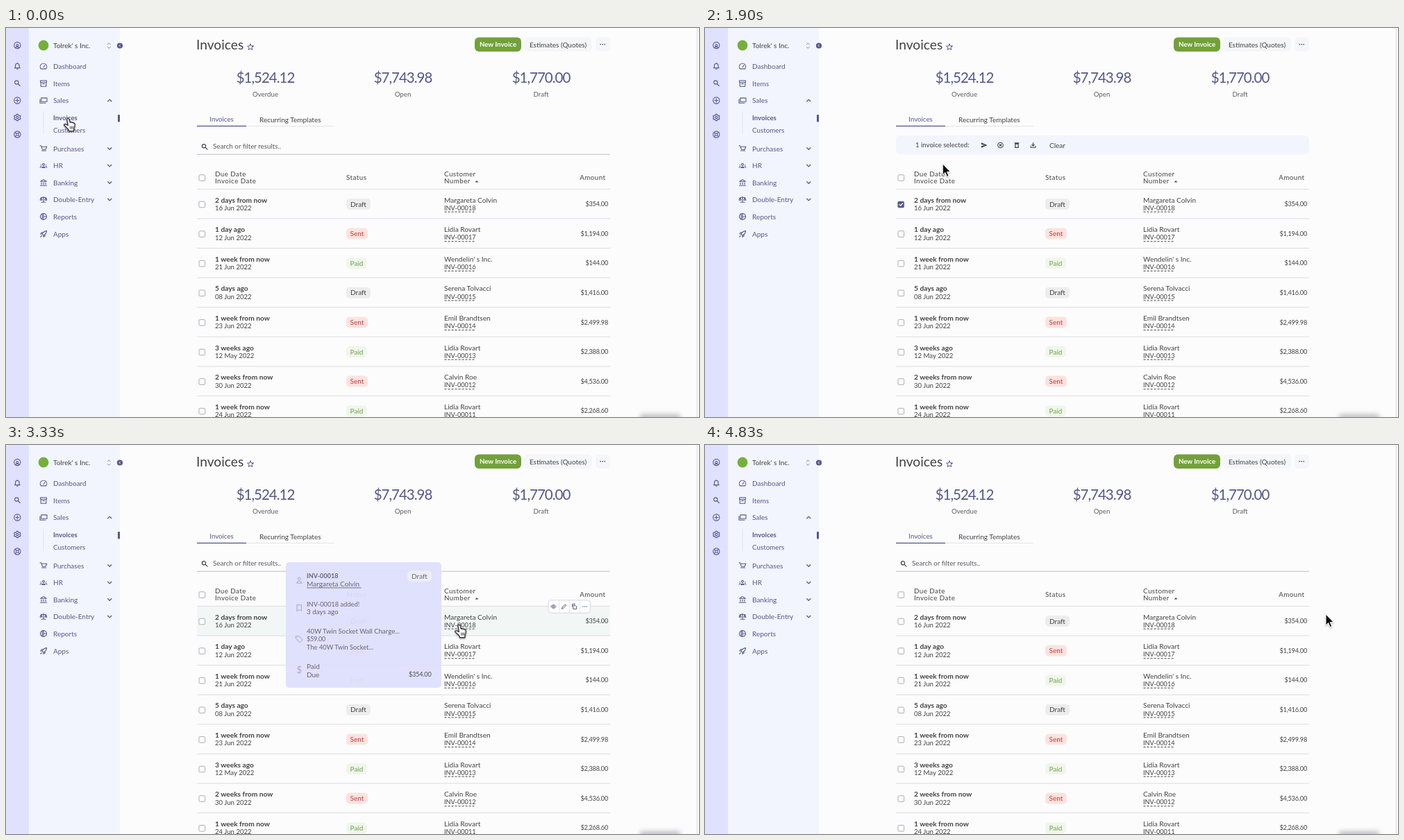
Animation, 998 px wide and 561 px high, one loop 5 s. Source, as an HTML page:

```html
<!DOCTYPE html>
<html lang="en">
<head>
<meta charset="utf-8">
<title>Invoices</title>
<style>
html, body { margin: 0; width: 100%; height: 100%; overflow: hidden; background: #fcfcfd; }
svg { display: block; width: 998px; height: 561px; font-family: Lato, sans-serif; }
</style>
</head>
<body>
<svg id="stage" viewBox="0 0 998 561" xmlns="http://www.w3.org/2000/svg"></svg>
<script>
const PURPLE = '#55588b', INK = '#424242', LOOP = 5000;
const TOP = 232.4, PITCH = 42.6;

// Markup helpers; text is placed by its vertical centre.
const text = (x, y, s, { size = 10, fill = INK, w = 400, a = 'start', ls = 0 } = {}) =>
  `<text x="${x}" y="${y + 3.5 * size / 10}" font-size="${size}" fill="${fill}" font-weight="${w}" text-anchor="${a}" letter-spacing="${ls}">${s}</text>`;
const rect = (x, y, w, h, fill, r = 0, more = '') =>
  `<rect x="${x}" y="${y}" width="${w}" height="${h}" rx="${r}" fill="${fill}" ${more}/>`;
const icon = (x, y, d, color = PURPLE, sw = 1.1) =>
  `<path transform="translate(${x} ${y})" d="${d}" fill="none" stroke="${color}" stroke-width="${sw}" stroke-linejoin="round" stroke-linecap="round"/>`;
const solid = (x, y, d, color = PURPLE) =>
  `<path transform="translate(${x} ${y})" d="${d}" fill="${color}" fill-rule="evenodd"/>`;
const ring = r => `M${-r} 0a${r} ${r} 0 1 1 ${2 * r} 0a${r} ${r} 0 1 1 ${-2 * r} 0`;
const dots = (x, y, gap, r) => [-gap, 0, gap].map(d => solid(x + d, y, ring(r))).join('');

const ICON = {
  user: ring(4.6) + ring(1.5) + 'M-3 3.4Q0 .8 3 3.4',
  bell: 'M-3.8 2.6H3.8L2.8 1.4V-1Q2.6-3.8 0-3.8Q-2.6-3.8-2.8-1V1.4ZM-.8 4.2H.8M0-4.8V-4',
  find: 'M-3.6-1a2.6 2.6 0 1 1 5.2 0a2.6 2.6 0 1 1-5.2 0M1 1L4 4',
  plus: ring(4.6) + 'M-2.4 0H2.4M0-2.4V2.4',
  gear: ring(1.6) + 'M-1-4.6H1L1.4-3.2L2.6-2.6L3.9-3L4.7-1.4L3.7-.4V.4L4.7 1.4L3.9 3L2.6 2.6L1.4 3.2L1 4.6H-1L-1.4 3.2L-2.6 2.6L-3.9 3L-4.7 1.4L-3.7 .4V-.4L-4.7-1.4L-3.9-3L-2.6-2.6L-1.4-3.2Z',
  help: ring(4.6) + ring(1.8) + 'M-3.2-3.2L-1.3-1.3M3.2-3.2L1.3-1.3M-3.2 3.2L-1.3 1.3M3.2 3.2L1.3 1.3',
  dial: 'M-3.6 3.4A4.7 4.7 0 1 1 3.6 3.4ZM0 1L2-1.6',
  box: 'M-4.4-4.2H4.4V-1.8H-4.4ZM-3.8-1.8V4.2H3.8V-1.8M-1.3 .4H1.3',
  cash: 'M-3.2-3.6H5V1.8H-3.2ZM-5-1.6V3.8H3',
  cart: 'M-5-4.2H-3.4L-1.6 1.2H3L4.8-2.8H-2.8M-2.4 3H3.6',
  team: 'M-1.4-1.8a1.4 1.4 0 1 1 2.8 0a1.4 1.4 0 1 1-2.8 0M-2.6 3Q0 .2 2.6 3ZM-4.8 2.6Q-4.4 1-3 1M4.8 2.6Q4.4 1 3 1M-3.8-1.2V-.8M3.8-1.2V-.8',
  bank: 'M-4.4-1.8L0-4.4L4.4-1.8ZM-3 0V2.6M0 0V2.6M3 0V2.6M-4.6 4.2H4.6',
  scale: 'M0-4.4V3.8M-3 3.8H3M-3.6-3H3.6M-4.8 .8L-3.4-3L-2 .8ZM2 .8L3.4-3L4.8 .8Z',
  chart: ring(4.5) + 'M0-4.4V4.4M0 0H4.4M-1.8-4V4',
  rocket: 'M-2 .2Q0-4 4.6-4.4Q4.2 0 0 2.2ZM-2 .2L-4.2 0L-2.6-2.2L-.8-2M0 2.2L0 4.4L2.2 2.8L2 1M-4.4 4.4L-2.6 2.6',
  down: 'M-2.6-1.2L0 1.4L2.6-1.2',
  up: 'M-2.6 1.2L0-1.4L2.6 1.2',
  eye: 'M-3.8 0Q0-5 3.8 0Q0 5-3.8 0' + ring(1.2),
  pen: 'M-3 3L-2.4 1L1.8-3.2L3.2-1.8L-1 2.4Z',
  copy: 'M-1.4-1.6H1.6L3 0V3.6H-1.4ZM-3-.2V-3.6H1',
  cancel: ring(3.8) + 'M-1.4-1.4L1.4 1.4M1.4-1.4L-1.4 1.4',
  bin: 'M-2.2-1.8H2.2V3.4H-2.2ZM-3-3.2H3',
  load: 'M0-3.4V1M-1.8-.6L0 1.2L1.8-.6M-3.4 1.4V3.2H3.4V1.4',
  person: 'M-1.9-2.2a1.9 1.9 0 1 1 3.8 0a1.9 1.9 0 1 1-3.8 0M-3.8 3.8Q-3 1.4 0 1.4Q3 1.4 3.8 3.8Z',
  mark: 'M-3-4.4H3V4.4L0 2.4L-3 4.4Z',
  tag: 'M-4.6-4.2H-.4L4.8 .8L.8 4.8L-4.6-.4ZM-2.8-2.4V-2.3'
};

const rows = [
  ['2 days from now', '16 Jun 2022', 'Draft', 'Margareta Colvin', '354.00'],
  ['1 day ago', '12 Jun 2022', 'Sent', 'Lidia Rovart', '1,194.00'],
  ['1 week from now', '21 Jun 2022', 'Paid', "Wendelin' s Inc.", '144.00'],
  ['5 days ago', '08 Jun 2022', 'Draft', 'Serena Tolvacci', '1,416.00'],
  ['1 week from now', '23 Jun 2022', 'Sent', 'Emil Brandtsen', '2,499.98'],
  ['3 weeks ago', '12 May 2022', 'Paid', 'Lidia Rovart', '2,388.00'],
  ['2 weeks from now', '30 Jun 2022', 'Sent', 'Calvin Roe', '4,536.00'],
  ['1 week from now', '24 Jun 2022', 'Paid', 'Lidia Rovart', '2,268.60']
];
const badges = {
  Draft: ['#ededee', INK, 35],
  Sent: ['#fce3e0', '#c5392f', 31],
  Paid: ['#f0f6ea', '#6ea152', 30]
};
const badge = (x, y, s) => {
  const [bg, fg, w] = badges[s];
  return rect(x, y - 8, w, 16, bg, 5) + text(x + w / 2, y, s, { fill: fg, a: 'middle' });
};
const checkbox = y => rect(278, y - 4.2, 8.6, 8.6, '#fff', 1.5, 'stroke="#a3a3ab" stroke-width=".9"');
const money = (x, y, s) => text(x, y, '$' + s, { size: 9.2, a: 'end', ls: -0.22 });

function sidebar() {
  const strip = [['user', 25], ['bell', 55], ['find', 79.5], ['plus', 104.5], ['gear', 129], ['help', 153.5]];
  const menu = [
    ['Dashboard', 55.5, 'dial'], ['Items', 80, 'box'], ['Sales', 104.5, 'cash', 'up'],
    ['Purchases', 174, 'cart', 'down'], ['HR', 198.5, 'team', 'down'], ['Banking', 223, 'bank', 'down'],
    ['Double-Entry', 247.5, 'scale', 'down'], ['Reports', 272, 'chart'], ['Apps', 297, 'rocket']
  ];
  return rect(0, 0, 33, 561, '#e0e1ff') + rect(33, 0, 131, 561, '#f2f5fe') +
    strip.map(([n, y]) => icon(16.3, y, ICON[n])).join('') +
    '<circle cx="54" cy="25" r="7.4" fill="#75b03a"/>' +
    text(68, 25.5, "Tolrek' s Inc.") +
    icon(148.3, 23, 'M-2 .8L0-1.4L2 .8', '#8b8da8', 1) + icon(148.3, 28, 'M-2-.8L0 1.4L2-.8', '#8b8da8', 1) +
    `<circle cx="164" cy="25.5" r="4.1" fill="${PURPLE}"/>` + icon(163.8, 25.5, 'M.7-1.5L-.8 0L.7 1.5', '#fff', 1) +
    menu.map(([s, y, n, c]) => icon(54, y, ICON[n]) + text(68, y, s, { fill: PURPLE }) +
      (c ? icon(149.3, y, ICON[c], PURPLE, 1.3) : '')).join('') +
    rect(53.5, 121, 1, 32, '#e2e4f3') +
    text(68, 130, 'Invoices', { fill: PURPLE, w: 700, size: 9.6 }) + text(68, 147.3, 'Customers', { fill: PURPLE, size: 9.8 }) +
    rect(161, 125, 3, 10.5, PURPLE, 1);
}

function header() {
  const totals = [[373.5, '1,524.12', 'Overdue'], [571.5, '7,743.98', 'Open'], [770.5, '1,770.00', 'Draft']];
  return text(274, 24, 'Invoices', { size: 19.2 }) +
    icon(352, 27.4, 'M0-4.4L1.3-1.5L4.4-1.2L2-.9L4.4-1.2L2 .9L2.7 4L0 2.3L-2.7 4L-2 .9L-4.4-1.2L-1.3-1.5Z', PURPLE, 1) +
    rect(675, 13.5, 67, 20.5, '#72a13a', 6) + text(708.5, 24, 'New Invoice', { size: 9.7, fill: '#fff', w: 700, a: 'middle' }) +
    rect(746, 13.5, 98, 20.5, '#f4f6f8', 6) + text(795, 24, 'Estimates (Quotes)', { a: 'middle' }) +
    rect(849, 13.5, 21, 20.5, '#f4f6f8', 6) + dots(859.2, 23.6, 3, 0.95) +
    totals.map(([x, n, s]) => text(x, 72, '$' + n, { size: 20.5, fill: PURPLE, a: 'middle', ls: -1 }) +
      text(x, 96, s, { size: 9.7, fill: '#5c5c5c', a: 'middle' })).join('') +
    text(310.5, 132, 'Invoices', { size: 9.7, fill: PURPLE, a: 'middle' }) + text(365, 132, 'Recurring Templates') +
    rect(346, 141, 127, 1, '#e4e4ec') + rect(275, 140.8, 71, 1.3, PURPLE);
}

function table() {
  const head = { size: 9.8, ls: 0.45 };
  let s = checkbox(216) + text(301, 211, 'Due Date', head) + text(301, 220.5, 'Invoice Date', head) +
    text(490, 216, 'Status', head) + text(631, 211, 'Customer', head) + text(631, 220.5, 'Number', head) +
    solid(678, 221.3, 'M-2.4 1.2L0-1.4L2.4 1.2Z', INK) + text(863.5, 216, 'Amount', { ...head, a: 'end' });
  rows.forEach(([due, date, status, name, sum], i) => {
    const y = TOP + PITCH * i;
    s += rect(275, y - 0.5, 595, 1, '#dcdce2') + checkbox(y + 22) +
      text(301, y + 15.6, due, { size: 10.2, w: 700 }) + text(301, y + 27.2, date, { size: 9.6 }) +
      badge(490, y + 21.6, status) + text(631, y + 15.6, name, { size: 10.1 }) +
      text(631, y + 27.2, 'INV-000' + (18 - i), { size: 9.2 }) +
      `<path d="M631.5 ${y + 32.8}h45" stroke="${INK}" stroke-dasharray="3 2"/>` + money(867, y + 21.6, sum);
  });
  return s;
}

const search = icon(286, 171.2, ICON.find, INK, 1.2) +
  text(298, 171, 'Search or filter results..', { size: 9.8, fill: '#5a5a5e' }) + rect(275, 181.7, 595, 1, '#bcbcc6');

const tools = [[402, 'Mark Sent'], [425.5, 'Cancel'], [449, 'Delete'], [472.5, 'Export']];
const bulk = rect(275, 155, 595, 27.5, '#f2f5fe', 6) + '<circle id="spot" cy="169" r="9.8" fill="#e2e4ea"/>' +
  text(303, 169, '1 invoice selected:', { size: 9.6 }) +
  solid(402, 169, 'M-4-3.8L4.6 0L-4 3.8V.9L1.4 0L-4-.9Z', INK) +
  icon(425.5, 169, ICON.cancel, INK) + icon(449, 169, ICON.bin, INK, 1.2) + icon(472.5, 169, ICON.load, INK) +
  text(496, 169, 'Clear') +
  rect(277.6, 250, 9.2, 9.2, PURPLE, 1.8) + icon(282.2, 254.6, 'M-2.3 0L-.7 1.7L2.4-1.6', '#fff', 1.3);

const acts = [[788.5, 'Show'], [803.5, 'Edit'], [818.5, 'Duplicate'], [833.5, 'More']];
const actions = rect(781, -8.6, 60.4, 18.4, '#fff', 4, 'stroke="#d3d5e6"') +
  [796, 811, 826].map(x => rect(x, -8.6, 0.8, 18.4, '#dfe0ee')).join('') +
  icon(788.5, 0.6, ICON.eye, PURPLE, 1) + icon(803.5, 0.6, ICON.pen, PURPLE, 1) +
  icon(818.5, 0.6, ICON.copy, PURPLE, 1) + dots(833.5, 0.6, 2.6, 0.75);

const GREY = '#5b5c6b', FAINT = '#a2a3bb';
const card = rect(403, 169, 224, 181, '#dfe0fd', 5) +
  icon(422.3, 195, ICON.person, FAINT, 1) + icon(422.3, 235, ICON.mark, FAINT, 1) + icon(422.3, 280, ICON.tag, FAINT, 1) +
  text(422.3, 324.5, '$', { size: 13, fill: FAINT, a: 'middle' }) +
  text(433, 189, 'INV-00018', { size: 9.1, fill: GREY, w: 700 }) +
  text(433, 200.5, 'Margareta Colvin', { size: 10.1, fill: GREY }) + rect(433, 205.5, 78.5, 0.9, GREY) +
  rect(578, 181, 35, 16, '#ecedf4', 5) + text(595.5, 189, 'Draft', { fill: GREY, a: 'middle' }) +
  text(433, 229.5, 'INV-00018 added!', { size: 9.3, fill: GREY }) + text(433, 241, '3 days ago', { size: 9.8, fill: GREY }) +
  text(433, 268.5, '40W Twin Socket Wall Charge...', { size: 9.6, fill: GREY }) +
  text(433, 280, '$59.00', { size: 9, fill: GREY, ls: -0.2 }) + text(433, 291.5, 'The 40W Twin Socket...', { size: 9.3, fill: GREY }) +
  text(433, 319.5, 'Paid', { fill: GREY }) + text(433, 331, 'Due', { fill: GREY }) + money(612.5, 331, '354.00');

const hand = '<path d="M-1.4 1.4C-1-.3 1.3-.3 1.8 1.3L3.4 6.3C4.2 5.3 5.9 5.5 6.3 6.7C7.2 5.9 8.6 6.4 8.8 7.6C9.9 7.3 10.3 8.3 10.2 9.6C10.1 13 9.2 14 8.8 16V18.6H1.4L1 16.6C-1 14.8-2.8 12.4-5 10.6C-6 9.2-4.6 8-3 8.8L.2 10.4Z" fill="#fff" stroke="#333" stroke-width="1.4" stroke-linejoin="round"/>' +
  '<path d="M3.4 11.6L3.7 15.6M5.4 11.4L5.6 15.6M7.4 11.4L7.4 15.4" stroke="#333" stroke-width=".9"/>';
const arrow = '<path d="M0 0V16L3.7 12.6L6.2 18.6L8.8 17.5L6.3 11.7H11.3Z" fill="#111" stroke="#fff" stroke-width="1"/>';

document.getElementById('stage').innerHTML =
  '<defs><filter id="soft" x="-50%" y="-150%" width="200%" height="400%"><feGaussianBlur stdDeviation="3.5"/></filter>' +
  '<filter id="drop" x="-50%" y="-50%" width="200%" height="200%"><feDropShadow dx="0" dy="1.2" stdDeviation="1.2" flood-opacity=".35"/></filter></defs>' +
  rect(0, 0, 998, 561, '#fcfcfd') + rect(994.8, 0, 1.2, 561, '#dedee3') +
  rect(913, 557, 58, 10, '#bfbfc4', 3, 'filter="url(#soft)"') +
  sidebar() + header() +
  `<g id="search">${search}</g>` +
  rect(275, 0, 595, PITCH, '#f2f7f6', 0, 'id="glow"') + table() +
  `<g id="bulk">${bulk}</g><g id="actions">${actions}</g><g id="card">${card}</g>` +
  '<g id="tip"><rect height="17.5" y="-8.8" rx="4" fill="#fff" stroke="#dcdce3"/>' + text(0, 0, '', { a: 'middle', fill: '#222' }) + '</g>' +
  `<g id="cursor" filter="url(#drop)"><g id="hand">${hand}</g><g id="arrow">${arrow}</g></g>`;

const $ = id => document.getElementById(id);
const show = (id, on) => $(id).setAttribute('display', on ? 'inline' : 'none');
const move = (id, x, y) => $(id).setAttribute('transform', `translate(${x} ${y})`);

// Pointer path: time, x, y
const path = [
  [0, 89, 130], [225, 89, 130], [460, 312, 251], [625, 312, 251], [860, 336, 459], [985, 341, 532],
  [1130, 336, 489], [1155, 336, 489], [1430, 264, 345], [1660, 282, 249], [1790, 282, 249],
  [1900, 342, 196], [2300, 421, 171], [2325, 421, 171], [2500, 464, 169.5], [2730, 507, 168],
  [2895, 507, 168], [3180, 640, 252], [3345, 652, 259], [3695, 652, 259], [3730, 682, 255],
  [3960, 790, 236], [4095, 790, 236], [4530, 849, 235], [4720, 849, 235], [4830, 894, 244], [LOOP, 894, 244]
];

const still = (a, b) => a[1] === b[1] && a[2] === b[2];
function slope(i, k) {
  const a = path[i - 1], p = path[i], b = path[i + 1];
  return !a || !b || still(a, p) || still(p, b) ? 0 : (b[k] - a[k]) / (b[0] - a[0]);
}
function pointer(t) {
  const i = Math.max(1, path.findIndex(p => p[0] > t)), a = path[i - 1], b = path[i];
  const d = b[0] - a[0], u = (t - a[0]) / d, v = 1 - u;
  return [1, 2].map(k => v * v * (1 + 2 * u) * a[k] + u * u * (3 - 2 * u) * b[k] +
    d * u * v * (v * slope(i - 1, k) - u * slope(i, k)));
}

function setTip(item, y) {
  show('tip', item);
  if (!item) return;
  const [box, label] = $('tip').children;
  label.textContent = item[1];
  const w = label.getComputedTextLength() + 10;
  box.setAttribute('width', w);
  box.setAttribute('x', -w / 2);
  move('tip', item[0] + 2, y);
}

function draw(t) {
  const [x, y] = pointer(t);
  const near = (list, r) => list.find(p => Math.abs(p[0] - x) < r);
  const row = x > 275 && x < 870 && y > TOP ? Math.floor((y - TOP) / PITCH) : -1;
  const top = TOP + PITCH * row;
  const picked = t >= 1800 && t < 2900;
  const onBar = picked && y > 158 && y < 180 && x > 392 && x < 522;
  const tool = onBar && near(tools, 9.8);
  const act = row >= 0 && Math.abs(y - top) < 9.5 && near(acts, 7.5);
  const link = x < 120 && y < 155;

  show('search', !picked);
  show('bulk', picked);
  show('spot', tool);
  if (tool) $('spot').setAttribute('cx', tool[0]);
  show('glow', row >= 0);
  show('actions', row >= 0);
  move('glow', 0, top);
  move('actions', 0, top);
  setTip(tool || act, tool ? 146.7 : top - 21.5);

  const fade = t < 3710 ? Math.min(1, Math.max(0, (t - 3200) / 140)) : 0;
  show('card', fade > 0);
  $('card').setAttribute('opacity', fade);

  const pointing = row >= 0 || onBar || link;
  show('hand', pointing);
  show('arrow', !pointing);
  move('cursor', x, y);
}

const start = performance.now();
function frame() {
  draw((performance.now() - start) % LOOP);
  requestAnimationFrame(frame);
}
frame();
</script>
</body>
</html>
```
